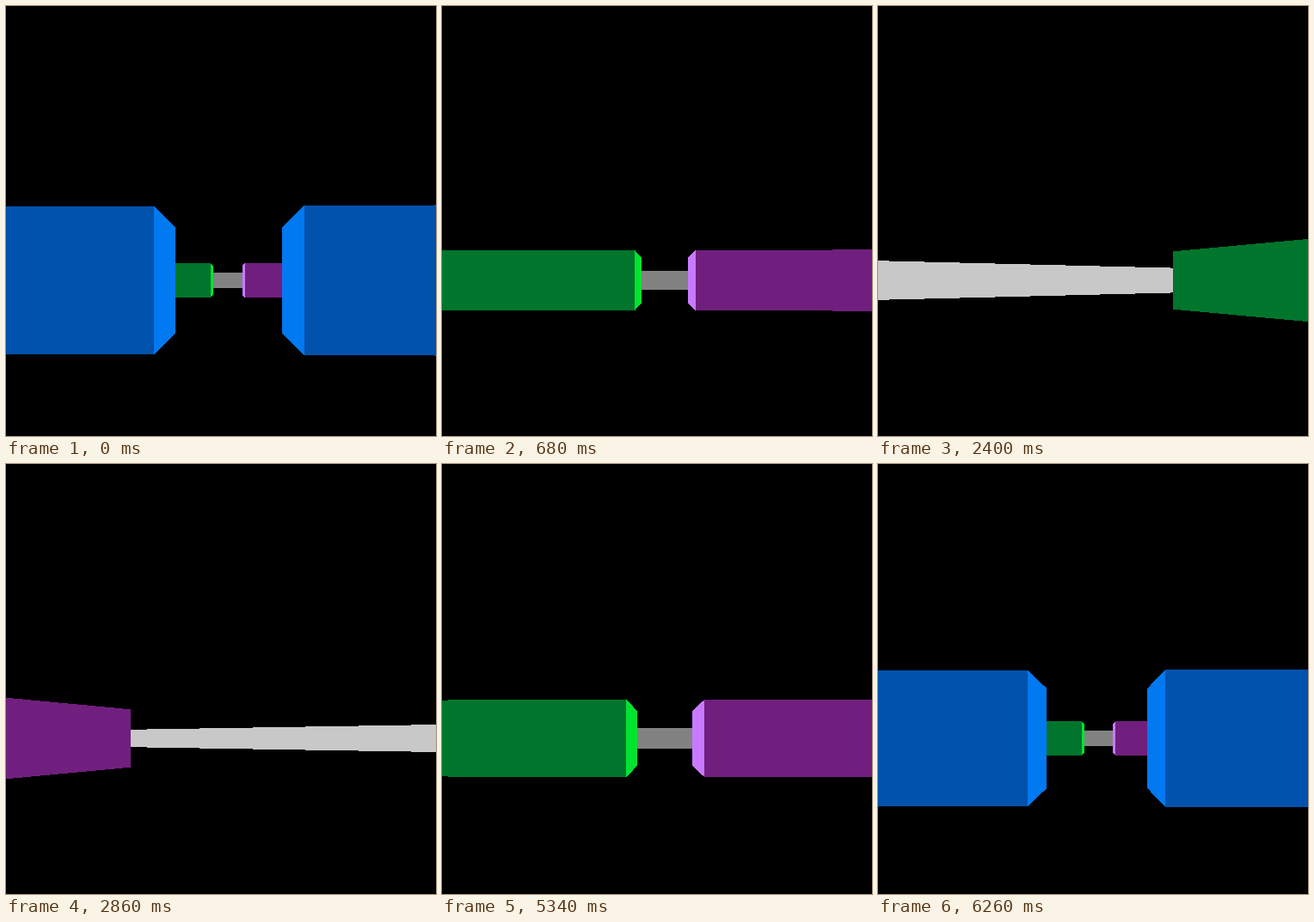
These frames come from a looping animation (500x500 px, 7.48 s). An HTML page with a canvas:

```html
<!DOCTYPE html>
<html>
<head>
<meta charset="utf-8">
<style>
html, body { margin: 0; height: 100%; overflow: hidden; background: #000; }
canvas { display: block; }
</style>
</head>
<body>
<canvas id="view" width="500" height="500"></canvas>
<script>
const ctx = document.getElementById('view').getContext('2d');
const SIZE = 500, HORIZON = 319, FOCAL = 433, LOOP = 7480, STEP = 20;

// Colours of the faces across z (front) and across x (side)
const BLUE = { front: '#0052ac', side: '#0079f1' };
const GREEN = { front: '#00752c', side: '#00e430' };
const PURPLE = { front: '#701f7e', side: '#c87aff' };
const GRAY = { front: '#828282', side: '#c8c8c8' };

const room = { left: -10.97, right: 15.63, back: 13 };
const INNER = 0.504, OUTER = 4.72;

// A pair of blocks, one on each side of the corridor
const pair = (z0, z1, left, right) => [
  { x0: -OUTER, x1: -INNER, z0, z1, color: left },
  { x0: INNER, x1: OUTER, z0, z1, color: right },
];
const blocks = [...pair(-8.265, -7.25, BLUE, BLUE), ...pair(0, 2, GREEN, PURPLE)];

// 0 before start, 1 after end, linear between
const ramp = (t, start, end) => Math.min(1, Math.max(0, (t - start) / (end - start)));

// Walk in, look left, look right, face forward, walk back out
function cameraAt(t) {
  const retreat = ramp(t, 5309, 6260);
  return {
    x: -0.011 - 0.017 * ramp(t, 0, 300) + 0.051 * retreat,
    z: -10.763 + 6.153 * ramp(t, 0, 900) ** 1.025 - 6.38 * retreat,
    turn: 0.017 + 1.077 * ramp(t, 1385, 1620) - 2.131 * ramp(t, 2380, 2860)
      + 1.054 * ramp(t, 3820, 4060),
  };
}

// Nearest surface along a ray
function cast(x, z, dx, dz) {
  const sideDepth = ((dx < 0 ? room.left : room.right) - x) / dx;
  const backDepth = dz > 0 ? (room.back - z) / dz : Infinity;
  let depth = Math.min(sideDepth, backDepth);
  let color = sideDepth < backDepth ? GRAY.side : GRAY.front;
  const span = (a, b, from, d) => [(a - from) / d, (b - from) / d].sort((p, q) => p - q);
  for (const block of blocks) {
    const [xIn, xOut] = span(block.x0, block.x1, x, dx);
    const [zIn, zOut] = span(block.z0, block.z1, z, dz);
    const enter = Math.max(xIn, zIn);
    if (enter > 0 && enter < Math.min(xOut, zOut, depth)) {
      depth = enter;
      color = xIn > zIn ? block.color.side : block.color.front;
    }
  }
  return { depth, color };
}

function draw() {
  const time = Math.floor(performance.now() % LOOP / STEP) * STEP;
  const { x, z, turn } = cameraAt(time);
  const sin = Math.sin(turn), cos = Math.cos(turn);
  ctx.fillStyle = '#000';
  ctx.fillRect(0, 0, SIZE, SIZE);
  for (let col = 0; col < SIZE; col++) {
    const u = (col + 0.5 - SIZE / 2) / FOCAL;
    const { depth, color } = cast(x, z, u * cos - sin, cos + u * sin);
    const half = Math.round(FOCAL / depth / 2);
    ctx.fillStyle = color;
    ctx.fillRect(col, HORIZON - half, 1, 2 * half);
  }
  requestAnimationFrame(draw);
}
draw();
</script>
</body>
</html>
```
